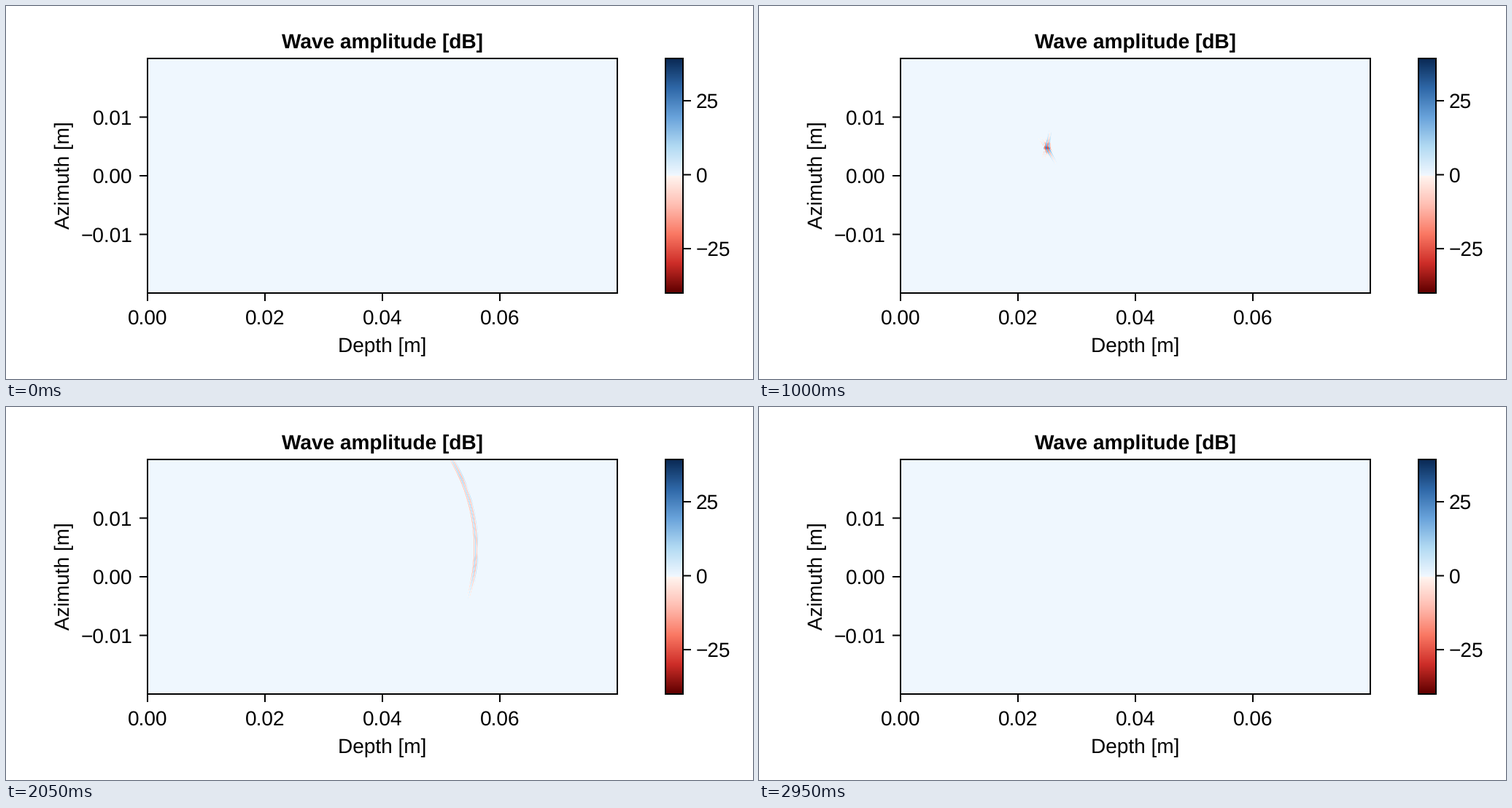
A matplotlib script for the animation above (3000 ms loop, 1024 px wide and 512 px high).

```python
import numpy as np
import matplotlib.pyplot as plt
from matplotlib.animation import FuncAnimation
from matplotlib.colors import LinearSegmentedColormap
from matplotlib.patches import Rectangle

W, H = 1024, 512
X0, X1, Y0, Y1 = 194, 838, 72, 394      # wave panel
C0, C1 = 904, 928                       # colour bar
ROWS, COLS = Y1 - Y0, X1 - X0
VMIN, VMAX = -40, 39.3
FRAMES, INTERVAL = 60, 50
SCALE = COLS / 0.08                     # pixels per metre

# Phased array on the left wall; lengths in pixels, times in frames
SPEED, WAVE, BURST = 11.85, 3.6, 10.0
FOCUS_X, FOCUS_Y, FOCUS_T = 211, 121, 20.84
PEAK_DB = 30                            # level at the focus
elements = ROWS / 2 + np.linspace(-93, 93, 160)
reach = np.hypot(FOCUS_X, elements - FOCUS_Y)
gain = 10 ** (PEAK_DB / 20) / np.sum(FOCUS_X / reach ** 2)

reds = LinearSegmentedColormap.from_list(
    "reds", ["#5f0000", "#cd2d28", "#fa7863", "#ffbeb2", "#fff5f0"])
blues = LinearSegmentedColormap.from_list(
    "blues", ["#f1f8ff", "#b2daf3", "#69a3db", "#2f68a8", "#0a2a55"])
half = np.linspace(0, 1, 512)
cmap = LinearSegmentedColormap.from_list(
    "waves", np.vstack([reds(half), blues(half)]), N=1024)


def pulse(u):
    """Tone burst with a smooth envelope, u from 0 to BURST."""
    return (np.sin(np.pi * u / BURST)
            * np.sin(2 * np.pi * (u - BURST / 2) / WAVE))


def add_speckle(level, frame, front):
    """Faint ringing in the wedge behind the young wave."""
    rng = np.random.default_rng(frame)
    x = rng.uniform(max(0, front - 60), front, 70)
    y = 145 + x * rng.uniform(-0.6, 0.4, x.size)
    level[y.astype(int), x.astype(int)] = rng.uniform(-5, 5, x.size)


def field(frame):
    """Signed level in dB on the pixel grid of the panel."""
    level = np.zeros((ROWS, COLS), dtype=np.float32)
    if frame == 0:
        return level
    front = FOCUS_X + SPEED * (frame - FOCUS_T)
    if 4 < frame < 13:
        add_speckle(level, frame, front)

    lo = int(np.clip(front - 65, 0, COLS - 1))
    hi = int(np.clip(front + 55, lo + 1, COLS))
    x = np.arange(lo, hi, dtype=np.float32)[None, :] + 0.5
    y = np.arange(ROWS, dtype=np.float32)[:, None] + 0.5
    depth = np.broadcast_to(x, (ROWS, hi - lo))
    wave = np.zeros(depth.shape, dtype=np.float32)
    for pos, far in zip(elements, reach):
        head = np.float32(SPEED * (frame - FOCUS_T) + far + BURST / 2)
        if head <= 0:
            continue
        r = np.sqrt(x * x + (y - np.float32(pos)) ** 2)
        on = (r < head) & (r > head - np.float32(BURST))
        d = r[on]
        wave[on] += gain * depth[on] / np.maximum(d, 4) ** 2 * pulse(head - d)
    loud = np.abs(wave) > 1
    level[:, lo:hi][loud] = (np.sign(wave) * 20
                             * np.log10(np.maximum(np.abs(wave), 1)))[loud]
    return level


plt.rcParams["font.family"] = "Liberation Sans"
plt.rcParams["text.hinting"] = "none"
PT = 0.72                               # points per pixel at 100 dpi
fig = plt.figure(figsize=(W / 100, H / 100), dpi=100, facecolor="white")
ax = fig.add_axes([0, 0, 1, 1])
ax.axis("off")


def label(x, y, text, ha="center", **kw):
    ax.text(x, y, text, ha=ha, va="baseline", fontsize=28 * PT,
            color="black", **kw)


def tick(xs, ys):
    ax.plot(xs, ys, color="black", lw=2 * PT, solid_capstyle="butt",
            snap=False, zorder=3)


def box(x0, x1):
    ax.add_patch(Rectangle((x0, Y0), x1 - x0, ROWS, fill=False,
                           ec="black", lw=2 * PT, zorder=4))


def number(value, digits):
    return f"{value:.{digits}f}".replace("-", "\u2212")


style = dict(cmap=cmap, vmin=VMIN, vmax=VMAX, interpolation="nearest",
             aspect="auto", origin="upper")
panel = ax.imshow(field(0), extent=(X0, X1, Y1, Y0), **style)
ramp = np.linspace(VMAX, VMIN, ROWS)[:, None]
ax.imshow(ramp, extent=(C0, C1, Y1, Y0), **style)
ax.set_xlim(0, W)
ax.set_ylim(H, 0)
box(X0, X1)
box(C0, C1)

for i in range(4):
    x = X0 + 0.02 * i * SCALE
    tick([x, x], [Y1, Y1 + 11])
    label(x, 437, number(0.02 * i, 2))
for i in (-1, 0, 1):
    y = (Y0 + Y1) / 2 - 0.01 * i * SCALE
    tick([X0 - 11, X0], [y, y])
    label(173, y + 10, number(0.01 * i, 2), ha="right")

    y = Y0 + (VMAX - 25 * i) / (VMAX - VMIN) * ROWS
    tick([C1, C1 + 11], [y, y])
    label(946, y + 10, number(25 * i, 0), ha="left")

label(516, 58, "Wave amplitude [dB]", weight="bold")
label(516, 475, "Depth [m]")
label(87, 232, "Azimuth [m]", rotation=90, rotation_mode="anchor")


def update(frame):
    panel.set_data(field(frame))
    return (panel,)


anim = FuncAnimation(fig, update, frames=FRAMES, interval=INTERVAL,
                     repeat=True, repeat_delay=0, blit=False)
plt.show()
```
